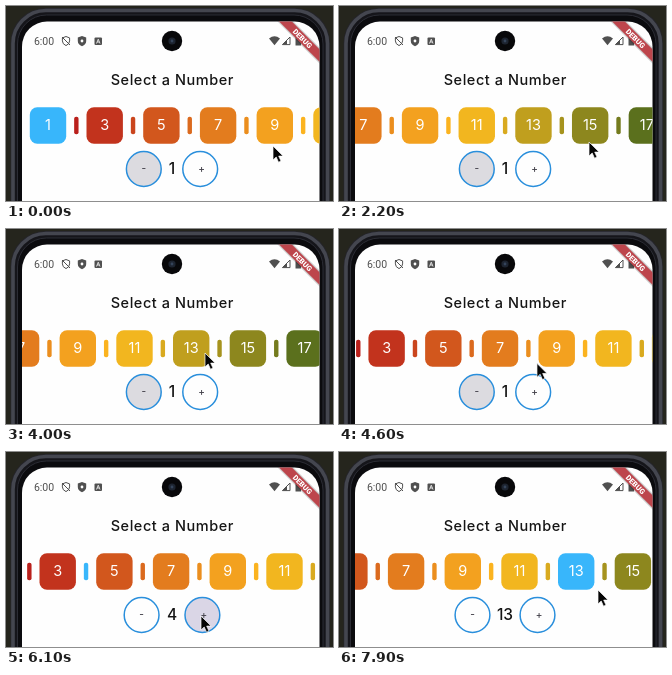
An HTML page for the animation above (8000 ms loop, 327 by 195 pixels).

```html
<!DOCTYPE html>
<html lang="en">
<head>
<meta charset="utf-8">
<title>Number picker</title>
<style>
  html, body { margin: 0; width: 100%; height: 100%; overflow: hidden; background: #25251d; }
  svg { display: block; width: 327px; height: 195px; }
  text { font-family: Inter, Roboto, sans-serif; font-weight: 500; text-anchor: middle; }
  .system { font-family: Roboto, sans-serif; font-weight: 400; }
  .banner { font-family: Roboto, sans-serif; font-weight: 900; }
  .light { font-weight: 400; }
</style>
</head>
<body>
<svg viewBox="0 0 327 195">
  <defs>
    <clipPath id="screen"><rect x="16" y="15.5" width="297.5" height="230" rx="25"/></clipPath>
  </defs>
  <rect width="327" height="195" fill="#25251d"/>
  <rect x="4.5" y="2" width="319.5" height="260" rx="35" fill="#24242a"/>
  <rect x="7" y="4.5" width="314.5" height="256" rx="33" fill="#15151a" stroke="#44464f" stroke-width="3.6"/>
  <rect x="11.5" y="9" width="305.5" height="250" rx="29" fill="#0b0b0e" stroke="#2b2c34"/>
  <g clip-path="url(#screen)">
    <rect x="16" y="15" width="298" height="180" fill="#fefefe"/>

    <g fill="#505050">
      <text class="system" x="38" y="39" font-size="10.5">6:00</text>
      <path d="M60 30.5l3.6 1.4v3q0 3.2-3.6 4.7q-3.6-1.5-3.6-4.7v-3zM56 31l8 8" fill="none" stroke="#505050"/>
      <path d="M76 30l4.2 1.6v3.3q0 3.5-4.2 5.3q-4.2-1.8-4.2-5.3v-3.3z"/>
      <circle cx="76" cy="35" r="1.4" fill="#fff"/>
      <rect x="88.5" y="31.5" width="7.5" height="7.5" rx="1"/>
      <path d="M90.5 37.5l1.75-4.3l1.75 4.3M91.2 36h2.1" fill="none" stroke="#fff" stroke-width=".8"/>
      <path d="M263 32.5q5.5-4.6 11 0l-5.5 6.7z"/>
      <path d="M284 31v7.6h-7.6z" fill="none" stroke="#505050"/>
      <path d="M281 34v4.6h-4.6z"/>
      <path d="M289.5 31h1.5v-1.3h2.5v1.3h1.5v8.6h-5.5z"/>
    </g>
    <circle cx="166" cy="35" r="10.2" fill="#08080a"/>
    <circle cx="166" cy="35" r="3.6" fill="#1d2430"/>
    <circle cx="166" cy="35" r="1.4" fill="#35445a"/>

    <text x="166.3" y="78.8" font-size="14.5" letter-spacing=".55" fill="#151515">Select a Number</text>
    <g id="list"></g>

    <g stroke="#2a8fdc" stroke-width="1.5">
      <circle id="minusRing" cy="163" r="17.4"/>
      <circle id="plusRing" cy="163" r="17.4"/>
    </g>
    <g font-size="10" fill="#45434c">
      <text id="minus" y="166.3">-</text>
      <text id="plus" y="166.3">+</text>
    </g>
    <text id="value" x="166" y="168.4" font-size="15.5" fill="#151515"></text>

    <g transform="translate(296.5 32.5) rotate(45)">
      <rect x="-32" y="-5.6" width="64" height="11.2" fill="#000" opacity=".2"/>
      <rect x="-30" y="-4.5" width="60" height="9" fill="#bd454c"/>
      <text class="banner" y="2.7" font-size="7.4" fill="#fff">DEBUG</text>
    </g>
  </g>
  <path id="cursor" d="M0 0v14l3.2-3l2.3 5.2l2.5-1.1l-2.3-5h4.4z" fill="#050505" stroke="#fff" stroke-width=".7"/>
</svg>
<script>
const LOOP = 8000, STEP = 100, COUNT = 19, PITCH = 28.35, FIRST_X = 42;
const SCROLL_END = 262, SELECTED = '#38b6fb';

// Red to amber to green across the numbers.
const RED = [178, 14, 28], AMBER = [255, 188, 31], GREEN = [40, 88, 29], AMBER_AT = 10.5;

const $ = id => document.getElementById(id);
const set = (el, attrs) => { for (const k in attrs) el.setAttribute(k, attrs[k]); };
const add = (parent, tag, attrs) => {
  const el = document.createElementNS('http://www.w3.org/2000/svg', tag);
  set(el, attrs);
  return parent.appendChild(el);
};
const clamp = (v, lo, hi) => Math.min(hi, Math.max(lo, v));
const mix = (a, b, p) => a.map((v, i) => v + (b[i] - v) * p);

// Eased progress from 0 to 1 between two times.
const ease = (t, from, to) => {
  const p = clamp((t - from) / (to - from), 0, 1);
  return p * p * (3 - 2 * p);
};

function colorOf(n) {
  const rgb = n < AMBER_AT
    ? mix(RED, AMBER, (n - 1) / (AMBER_AT - 1))
    : mix(AMBER, GREEN, (n - AMBER_AT) / (COUNT - AMBER_AT));
  return `rgb(${rgb.map(Math.round)})`;
}

// Two swipes to the end, a drag and fling back, then the list follows the taps.
const scrollAt = t =>
  79.4 * ease(t, 600, 1300) + (SCROLL_END - 79.4) * ease(t, 1300, 2900)
  - 65 * ease(t, 3300, 4000) - (SCROLL_END - 65) * ease(t, 4000, 4900)
  + 47 * ease(t, 5400, 6100) + 98 * ease(t, 6400, 7900);

// The pointer glides from stop to stop: start, end, x, y.
const GLIDES = [[600, 1300, 174, 138], [1500, 2100, 250, 136], [2200, 2900, 106, 133],
  [3300, 4000, 199, 124], [4300, 5200, 195, 164], [6700, 7500, 259, 138]];
const pointerAt = t => GLIDES.reduce(
  (pos, [from, to, ...stop]) => mix(pos, stop, ease(t, from, to)), [267, 140]);

// The plus button is tapped every 300 ms, later a tile is chosen directly.
const valueAt = t => t >= 7700 ? 13 : clamp(1 + Math.floor((t - 5200) / 300), 1, 5);

const items = Array.from({ length: COUNT }, (_, i) => {
  const n = i + 1, x = FIRST_X + PITCH * i, tile = n % 2;
  const [w, h, r] = tile ? [36.4, 36.4, 7.5] : [4.4, 17.5, 2];
  const rect = add($('list'), 'rect', { x: x - w / 2, y: 119.5 - h / 2, width: w, height: h, rx: r });
  if (tile) {
    add($('list'), 'text', { class: 'light', x, y: 124.4, 'font-size': 14.5, fill: '#fff' }).textContent = n;
  }
  return { n, rect };
});

function draw(t) {
  const value = valueAt(t), [x, y] = pointerAt(t);
  const gap = value === 1 ? 28.2 : value < 10 ? 30.4 : 32.5;
  const pressed = t >= 5400 && t < 6800;

  set($('list'), { transform: `translate(${-scrollAt(t)} 0)` });
  for (const { n, rect } of items) set(rect, { fill: n === value ? SELECTED : colorOf(n) });
  set($('minusRing'), { cx: 166 - gap, fill: value === 1 ? '#dcdbe0' : '#fefefe' });
  set($('plusRing'), { cx: 166 + gap, fill: pressed ? '#dad6e6' : '#fefefe' });
  set($('minus'), { x: 166 - gap });
  set($('plus'), { x: 167.5 + gap });
  $('value').textContent = value;
  set($('cursor'), { transform: `translate(${x} ${y})` });
}

const start = performance.now();
function frame() {
  const t = (performance.now() - start) % LOOP;
  draw(Math.floor(t / STEP) * STEP);
  requestAnimationFrame(frame);
}
frame();
</script>
</body>
</html>
```
